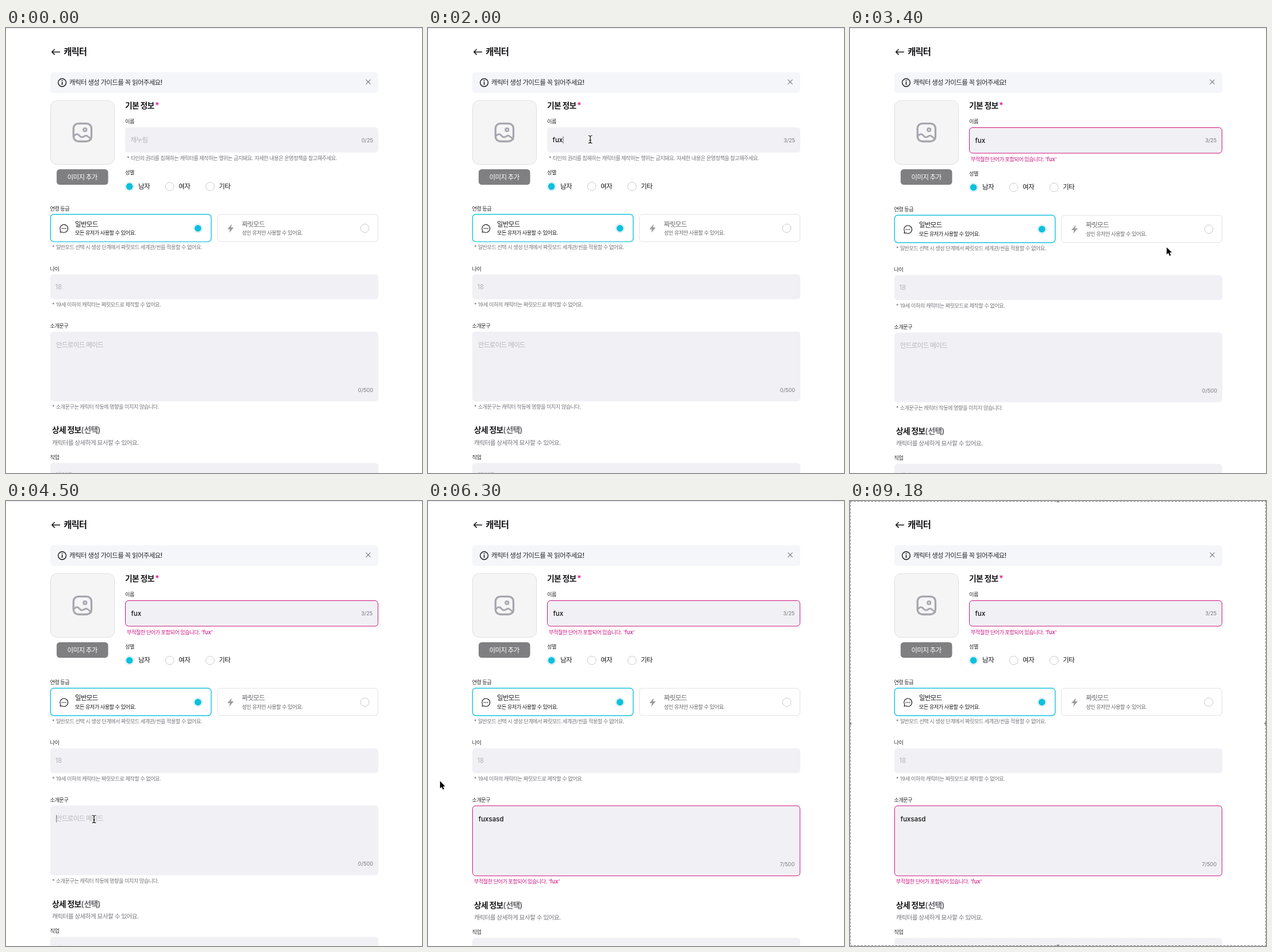
Recreate the animation shown at these times as an HTML page. Size 723 px wide and 775 px high, loop 9.36 s.

```html
<!DOCTYPE html>
<html lang="ko">
<head>
<meta charset="utf-8">
<style>
  html, body { margin: 0; width: 100%; height: 100%; overflow: hidden; background: #fff; }
  svg { display: block; width: 723px; height: 775px; }
  text { font-family: Inter, "Noto Sans CJK KR", "Noto Sans CJK", sans-serif; letter-spacing: -.057em; white-space: pre; }
  .latin { letter-spacing: 0; }
</style>
</head>
<body>
<svg id="stage" viewBox="0 0 723 775"></svg>
<script>
const LOOP = 9360, STEP = 100;
const INK = '#17171a', GRAY = '#77777d', PALE = '#b4b4ba', FIELD = '#f1f1f5',
      CYAN = '#0cc0dc', PINK = '#cf1580';
const SMALL = 9.2, SUB = 10.7, BODY = 11.5, TITLE = 13.8;
const stage = document.getElementById('stage');

function add(parent, tag, attrs = {}) {
  const el = document.createElementNS('http://www.w3.org/2000/svg', tag);
  for (const key in attrs) el.setAttribute(key, attrs[key]);
  return parent.appendChild(el);
}
const group = (parent = stage) => add(parent, 'g');
const rect = (p, x, y, width, height, rx, attrs) => add(p, 'rect', { x, y, width, height, rx, ...attrs });
const circle = (p, cx, cy, r, attrs) => add(p, 'circle', { cx, cy, r, ...attrs });
const line = (p, d, stroke, width) => add(p, 'path', {
  d, stroke, fill: 'none', 'stroke-width': width, 'stroke-linecap': 'round', 'stroke-linejoin': 'round' });

// Latin runs keep their natural spacing, Hangul is set tighter.
function setText(el, content) {
  if (el.textContent === content) return;
  el.textContent = '';
  for (const run of content.split(/([\x21-\x7e]+)/)) {
    if (!run) continue;
    add(el, 'tspan', /^[\x21-\x7e]/.test(run) ? { class: 'latin' } : {}).textContent = run;
  }
}
// y is the optical middle of the line.
function text(p, x, y, content, size = SMALL, fill = GRAY, weight = 400, anchor = 'start') {
  const el = add(p, 'text', { x, y: y + size * .365, fill, 'font-size': size, 'font-weight': weight, 'text-anchor': anchor });
  setText(el, content);
  return el;
}
const label = (p, x, y, content) => text(p, x, y, content, SMALL, '#2a2a2e', 500);

function radio(p, x, y, on) {
  circle(p, x, y, 7.4, { fill: '#fff', stroke: on ? '#b9dfe7' : '#cacad0', 'stroke-width': 1 });
  if (on) circle(p, x, y, 5.9, { fill: CYAN });
}

// A field that can hold typed text and switch to an error state.
function field(x, y, width, height, textX, textY, countY, max, hint, placeholder) {
  const box = rect(stage, x, y, width, height, 5.5, { fill: FIELD });
  const frame = rect(stage, x + .5, y + .5, width - 1, height + .5, 5.5, { fill: FIELD, stroke: PINK });
  const empty = text(stage, textX, textY, placeholder, BODY, PALE);
  const typed = text(stage, textX, textY, '', BODY, '#111114', 500);
  const count = text(stage, x + width - 9, countY, '', SMALL, GRAY, 400, 'end');
  const help = text(stage, hint.x, hint.y, hint.text);
  const error = text(stage, hint.x, hint.y + 1.7, "부적절한 단어가 포함되어 있습니다. 'fux'", SMALL, PINK, 500);
  const caret = rect(stage, textX, textY - 6.5, .8, 13, 0, { fill: '#55555a' });
  const parts = [box, frame, empty, typed, count, help, error, caret];
  return (value, bad, focus, dy) => {
    parts.forEach(el => el.setAttribute('transform', `translate(0 ${dy})`));
    if (bad) {
      typed.setAttribute('transform', `translate(.8 ${dy + .9})`);
      count.setAttribute('transform', `translate(-.8 ${dy + .9})`);
    }
    setText(typed, value);
    setText(count, `${value.length}/${max}`);
    show(empty, !value);
    show(frame, bad); show(error, bad);
    show(box, !bad); show(help, !bad);
    show(caret, focus);
    caret.setAttribute('x', textX + (value ? typed.getComputedTextLength() + .3 : 0));
  };
}
function show(el, on) { el.style.display = on ? '' : 'none'; }

// Header and banner
const topLine = rect(stage, 0, 0, 723, 1, 0, { fill: '#dcdcec' });
line(stage, 'M80 41.7H93.5M84.3 37.3L79.8 41.7L84.3 46.1', INK, 1.6);
text(stage, 100.3, 41.7, '캐릭터', 15.4, INK, 600);
rect(stage, 77, 77, 570, 36, 5.5, { fill: '#f5f6fa' });
circle(stage, 97.6, 95.1, 6.9, { fill: 'none', stroke: INK, 'stroke-width': 1.4 });
line(stage, 'M97.6 94.6V98.4', INK, 1.6);
circle(stage, 97.6, 91.7, 1, { fill: INK });
text(stage, 110, 95, '캐릭터 생성 가이드를 꼭 읽어주세요!', BODY, '#27272b', 500);
line(stage, 'M625.8 90.2L633.2 97.6M633.2 90.2L625.8 97.6', '#77777d', 1.1);

// Picture slot
rect(stage, 77.5, 126.5, 111, 111, 11, { fill: '#f5f5f6', stroke: '#e0e0e3' });
rect(stage, 117.3, 166.3, 31.2, 31.2, 8.5, { fill: 'none', stroke: '#a6a6ae', 'stroke-width': 3.3 });
circle(stage, 137.3, 177.3, 2.7, { fill: 'none', stroke: '#a6a6ae', 'stroke-width': 2.7 });
line(stage, 'M117.5 188.5L121 185.6Q123.5 184 126 186L129.5 189.2Q132 191 135 189.2L137 188Q140 186.8 142.5 189L148 193.5', '#a6a6ae', 2.9);
rect(stage, 88, 246, 89.5, 27, 5.5, { fill: '#7f7f82' });
text(stage, 132.6, 259.5, '이미지 추가', BODY, '#fff', 500, 'middle');

// Basic information
text(stage, 207, 135.2, '기본 정보', TITLE, INK, 600);
text(stage, 258.9, 135, '*', TITLE, '#e8178f', 600);
label(stage, 207, 163, '이름');
const nameField = field(207, 173, 440, 44, 216.6, 194.8, 195.2, 25,
  { x: 210, y: 226.6, text: '* 타인의 권리를 침해하는 캐릭터를 제작하는 행위는 금지돼요. 자세한 내용은 운영정책을 참고해주세요.' }, '채누림');

const middle = group();
label(middle, 207, 252, '성별');
['남자', '여자', '기타'].forEach((name, i) => {
  radio(middle, 214.6 + 70 * i, 276, !i);
  text(middle, 230 + 70 * i, 275.6, name, BODY, INK);
});

label(middle, 76.5, 314.2, '연령 등급');
function card(x, on, title, note) {
  if (on) rect(middle, x, 324.2, 280, 48.3, 6, { fill: 'none', stroke: CYAN, 'stroke-width': 2.5, opacity: .18 });
  rect(middle, x + .5, 324.6, 279, 47.4, 5.5, { fill: '#fff', stroke: on ? CYAN : '#e2e2e7', 'stroke-width': on ? 1.2 : 1 });
  text(middle, x + 43, 341.4, title, BODY, on ? INK : '#66666b');
  text(middle, x + 43, 356.6, note, SMALL, on ? INK : '#66666b');
  radio(middle, x + 256.6, 348.8, on);
}
card(77, true, '일반모드', '모든 유저가 사용할 수 있어요.');
card(367, false, '짜릿모드', '성인 유저만 사용할 수 있어요.');
line(middle, 'M94.2 355.8L94.8 352.8A6.9 6.9 0 1 1 97.2 355.2Z', INK, 1.1);
[97.6, 100.6, 103.6].forEach(x => circle(middle, x, 349.2, .9, { fill: INK }));
add(middle, 'path', { d: 'M392.2 341.6L384.8 350.4H389.2L388 356.4L395.8 347.4H391.2Z', fill: '#9b9ba0' });
text(middle, 80, 382, '* 일반모드 선택 시 생성 단계에서 짜릿모드 세계관/씬을 적용할 수 없어요.');

label(middle, 76.5, 419.2, '나이');
rect(middle, 77, 429, 570, 43.5, 5.5, { fill: FIELD });
text(middle, 85.4, 450.6, '18', BODY, PALE);
text(middle, 80, 481.6, '* 19세 이하의 캐릭터는 짜릿모드로 제작할 수 없어요.');

label(middle, 76.5, 518.7, '소개문구');
const introField = field(77, 528.7, 570, 121.5, 87, 551.6, 630.2, 500,
  { x: 80, y: 659.7, text: '* 소개문구는 캐릭터 작동에 영향을 미치지 않습니다.' }, '안드로이드 메이드');

// Details
const lower = group();
const details = text(lower, 80, 700.4, '상세 정보(선택)', TITLE, INK, 600);
details.textContent = '상세 정보';
const optional = add(details, 'tspan', { fill: '#66666b' });
setText(optional, '(선택)');
text(lower, 80, 721.6, '캐릭터를 상세하게 묘사할 수 있어요.', SUB);
label(lower, 76.5, 747.5, '직업');
rect(lower, 77, 757.5, 570, 44, 5.5, { fill: FIELD });
text(lower, 86, 778.6, '메이드', BODY, PALE);

// Suggestions
const menu = group();
menu.style.filter = 'drop-shadow(0 1px 2px rgba(0,0,0,.3))';
add(menu, 'path', { fill: '#fcfcfe', stroke: '#d2d2d6', 'stroke-width': .5,
  d: 'M305 211.5H309.5Q312 211 314.5 207.5Q317 204 319.5 207.5Q322 211 324.5 211.5H459Q464 211.5 464 216.5V396.5Q464 401.5 459 401.5H305Q300 401.5 300 396.5V216.5Q300 211.5 305 211.5Z' });
['123', '213', '이미지 BM 테스트2', '리팩토링 마스터 v2', '이미지 BM 테스트223123', '나무'].forEach((item, i) =>
  text(menu, 310, 231 + 30.4 * i, item, BODY, INK, 500));

// Capture frame
const capture = group();
rect(capture, .5, .5, 722, 774, 0, { fill: 'none', stroke: '#fff' });
rect(capture, .5, .5, 722, 774, 0, { fill: 'none', stroke: '#7c7c7c', 'stroke-dasharray': '4 2' });
[[361.5, .5], [361.5, 774.5], [.5, 387.5], [722.5, 387.5]].forEach(([x, y]) => circle(capture, x, y, 2.2, { fill: '#8a8a8a' }));

// Pointer shapes, hot spot at 0,0
const pointer = group();
const arrow = add(pointer, 'path', { d: 'M0 0V12.6L2.9 9.9L5 14.8L7.2 13.8L5.1 9.1H9Z',
  fill: '#000', stroke: '#fff', 'stroke-width': 1, 'stroke-linejoin': 'round', 'paint-order': 'stroke' });
const beam = group(pointer);
['#fff', '#000'].forEach((color, i) =>
  line(beam, 'M-3 -6.5Q-.5 -6.5 0 -5Q.5 -6.5 3 -6.5M0 -5V5M-3 6.5Q-.5 6.5 0 5Q.5 6.5 3 6.5M-1.5 1.5H1.5', color, i ? 1.2 : 2.8));

// time, x, y
const path = [
  [400, 420, 2], [1000, 282, 194], [2000, 282, 194], [2300, 346.8, 128], [2800, 624, 350],
  [3200, 624, 350], [4000, 153, 554], [5500, 153, 554], [5900, 180, 553], [6200, 10, 480],
  [6500, 52, 510], [6700, 302, 640], [6800, 302, 640], [7200, 372, 642]
];
const nameKeys = [1500, 1700, 2000];
const introKeys = [4800, 4900, 5000, 5100, 5200, 5300, 6000];
const typedBy = (word, keys, t) => word.slice(0, keys.filter(k => k <= t).length);
const within = (t, from, to) => t >= from && t < to;

function pointerAt(t) {
  const i = Math.max(1, path.findIndex(p => p[0] >= t));
  const [t0, x0, y0] = path[i - 1], [t1, x1, y1] = path[i];
  const k = (t - t0) / (t1 - t0), e = k * k * (3 - 2 * k);
  return [x0 + (x1 - x0) * e, y0 + (y1 - y0) * e];
}

function draw(t) {
  const badName = t >= 2200, badIntro = t >= 6200;
  const shift = badName ? 1.6 : 0;
  nameField(typedBy('fux', nameKeys, t), badName, within(t, 1500, 2200), 0);
  introField(typedBy('fuxsasd', introKeys, t), badIntro, within(t, 4200, 6200), shift);
  middle.setAttribute('transform', `translate(0 ${shift})`);
  lower.setAttribute('transform', `translate(0 ${shift + (badIntro ? 1.7 : 0)})`);
  show(menu, within(t, 1100, 1500));
  show(capture, t >= 8000);
  show(topLine, t < 8000);

  const visible = within(t, 400, 7200);
  show(pointer, visible);
  if (!visible) return;
  const [x, y] = pointerAt(t);
  const overInput = (x > 207 && x < 647 && y > 173 && y < 217) ||
    (x > 77 && x < 647 && ((y > 430 && y < 474) || (y > 530 && y < 652)));
  pointer.setAttribute('transform', `translate(${x} ${y})`);
  show(beam, overInput);
  show(arrow, !overInput);
}

const start = performance.now();
let last = -1;
function tick() {
  const t = Math.floor(((performance.now() - start) % LOOP) / STEP) * STEP;
  if (t !== last) draw(last = t);
  requestAnimationFrame(tick);
}
tick();
</script>
</body>
</html>
```
